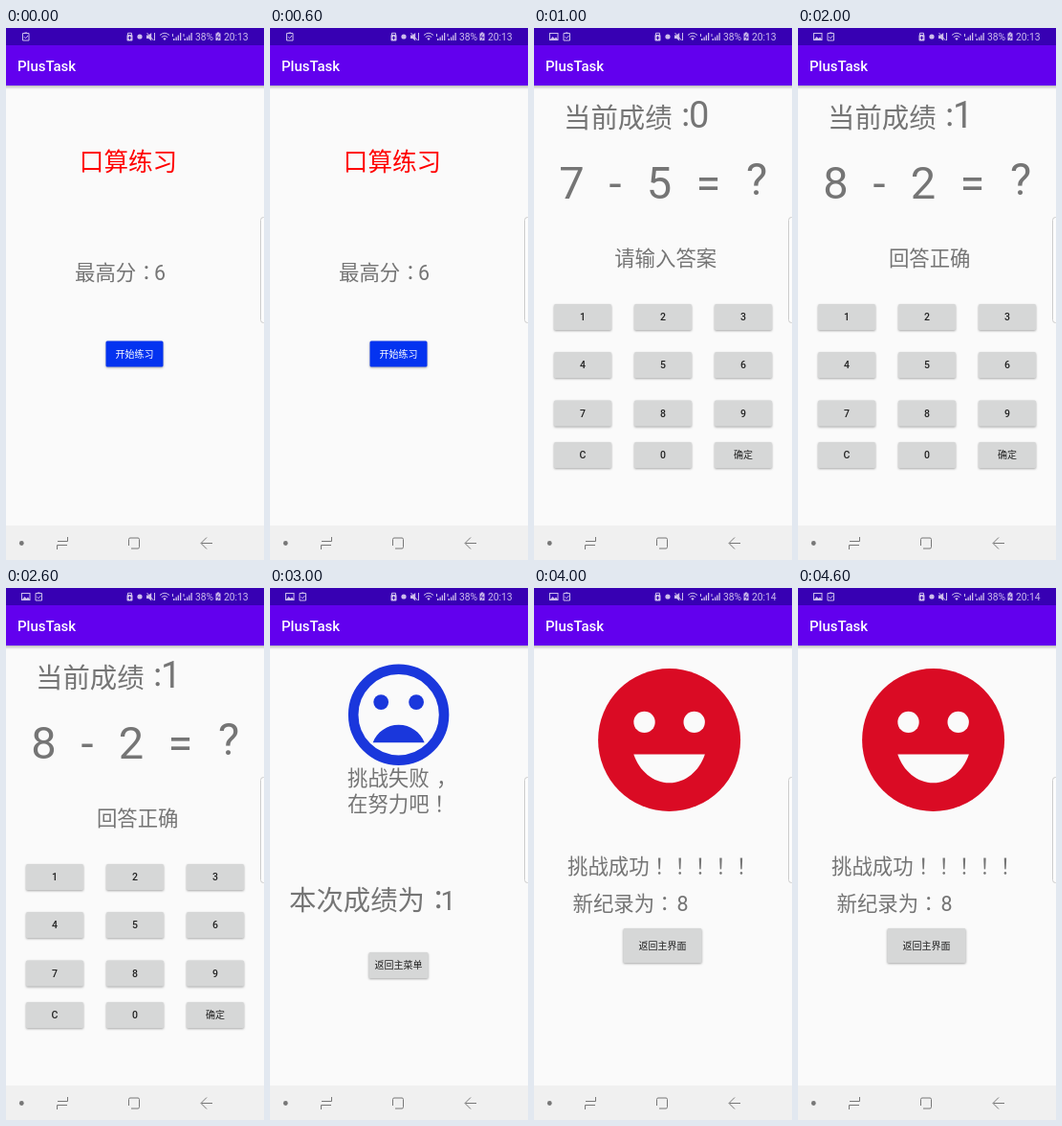
Write an HTML page that moves like this. It is 270x555 px and loops after 5 s.

```html
<!DOCTYPE html>
<html lang="zh-CN">
<head>
<meta charset="utf-8">
<title>口算练习</title>
<style>
  html, body { margin: 0; width: 100%; height: 100%; overflow: hidden; background: #fafafa; }
  svg { display: block; width: 270px; height: 555px; }
  text { font-family: Roboto, "Noto Sans CJK SC", "Noto Sans CJK", sans-serif; font-size: 21.4px; fill: #757575; white-space: pre; }
  /* Traditional forms centre the punctuation in its cell. */
  tspan[lang] { font-family: "Noto Sans CJK TC", "Noto Sans CJK", sans-serif; }
  .mid { text-anchor: middle; }
  .big { font-size: 28.4px; }
  .sum { font-size: 47px; text-anchor: middle; }
  .status text { font-size: 10.3px; fill: #cdbdec; }
  .line { fill: none; stroke: #cdbdec; }
  .button text { font-size: 10px; font-weight: 500; text-anchor: middle; }
  .button rect { filter: drop-shadow(0 1px 1px #0005); }
</style>
</head>
<body>
<svg viewBox="0 0 270 555">
  <defs>
    <linearGradient id="shade" x2="0" y2="1">
      <stop stop-color="#000" stop-opacity=".25"/>
      <stop offset="1" stop-color="#000" stop-opacity="0"/>
    </linearGradient>
  </defs>
  <rect width="270" height="555" fill="#fafafa"/>
  <rect y="60" width="270" height="4" fill="url(#shade)"/>
  <rect y="18" width="270" height="42" fill="#6200ee"/>
  <rect width="270" height="18" fill="#3700b3"/>
  <text x="12" y="45" style="font-size:15px;font-weight:500;fill:#fff">PlusTask</text>

  <g class="status" fill="#cdbdec">
    <g id="picture">
      <rect class="line" x="16.5" y="5.5" width="8.5" height="7"/>
      <path d="M17 12l2.5-3 2 2 1.5-1.5 2 2.5z"/>
    </g>
    <g id="clip" class="line">
      <path d="M17.5 5.5h6.5v7.5h-6.5zM19 9.2l1.5 1.6 2.5-2.8M19.5 5h2.5"/>
    </g>
    <rect x="126.5" y="7" width="6" height="6.5" rx="1"/>
    <path class="line" d="M127.5 7.5V5.3h4v2.2"/>
    <path d="M129.5 8.5v3.5M127.8 10.2h3.4" stroke="#3700b3"/>
    <circle cx="140" cy="9" r="2.6"/>
    <path d="M147 7.5h2.2l3-2.5v8.5l-3-2.5H147z"/>
    <path class="line" d="M147.5 5l7 8M155.5 5v8"/>
    <path class="line" d="M161 7.5q5-4.5 10 0M162.8 9.5q3.2-2.8 6.4 0"/>
    <path d="M164.3 11q1.7-1.4 3.4 0L166 13z"/>
    <g id="bars"><path d="M174 6h1v3h-1zM175 11h1.5v2H175zM177.5 9.5h1.3V13h-1.3zM179.7 7.5h1.3V13h-1.3zM182 5h1.3v8H182z"/></g>
    <use href="#bars" x="11.5"/>
    <text x="198" y="13">38%</text>
    <path d="M220.8 4.5h2.4v1h1.3V13h-5V5.5h1.3z"/>
    <path d="M222.5 6.5l-2 3h3l-2 3" fill="none" stroke="#3700b3" stroke-width=".8"/>
    <text id="clock" x="228" y="13"></text>
  </g>

  <g class="scene" data-at="0">
    <text class="mid" x="128" y="149" style="font-size:25.6px;fill:#f00">口算练习</text>
    <text x="72" y="262.5">最高分<tspan lang="zh-TW">：</tspan><tspan x="155">6</tspan></text>
    <g class="button" data-box="104.5 326.5 60 27" data-label="开始练习" data-fill="#0433f0" data-ink="#fff"></g>
  </g>

  <g class="scene" data-at="1 2">
    <text class="big" x="31" y="103.5">当前成绩<tspan lang="zh-TW">：</tspan></text>
    <text id="score" x="162" y="104" style="font-size:38px"></text>
    <text class="sum" id="left" x="39.5" y="178"></text>
    <text class="sum" x="85" y="178">-</text>
    <text class="sum" id="right" x="131" y="178"></text>
    <text class="sum" x="182.5" y="178">=</text>
    <text class="sum" x="233" y="174">?</text>
    <text class="mid" id="hint" x="137.7" y="248"></text>
    <g id="keys"></g>
  </g>

  <g class="scene" data-at="3">
    <g transform="translate(71.4 69) scale(5.27)" fill="#1a37dc">
      <circle cx="12" cy="12" r="9" fill="none" stroke="#1a37dc" stroke-width="2"/>
      <circle cx="8.5" cy="9.5" r="1.5"/>
      <circle cx="15.5" cy="9.5" r="1.5"/>
      <path d="M12 14c-2.33 0-4.32 1.45-5.12 3.5h10.24c-.8-2.05-2.79-3.5-5.12-3.5z"/>
    </g>
    <text x="81" y="206">挑战失败<tspan x="174">，</tspan></text>
    <text x="81" y="232.5">在努力吧<tspan lang="zh-TW">！</tspan></text>
    <text class="big" x="20" y="336">本次成绩为<tspan lang="zh-TW">：</tspan><tspan x="178.5">1</tspan></text>
    <g class="button" data-box="103.5 380 62 27" data-label="返回主菜单"></g>
  </g>

  <g class="scene" data-at="4">
    <g transform="translate(52.2 69.1) scale(7.45)" fill="#fafafa">
      <circle cx="12" cy="12" r="10" fill="#da0b24"/>
      <circle cx="8.5" cy="9.5" r="1.5"/>
      <circle cx="15.5" cy="9.5" r="1.5"/>
      <path d="M12 18c-2.28 0-4.22-1.66-5-4h10c-.78 2.34-2.72 4-5 4z"/>
    </g>
    <text x="35" y="298">挑战成功<tspan lang="zh-TW">！！！！！</tspan></text>
    <text x="40.5" y="337">新纪录为<tspan lang="zh-TW">：</tspan><tspan x="149.5">8</tspan></text>
    <g class="button" data-box="93.5 355 82 36" data-label="返回主界面"></g>
  </g>

  <rect x="266.5" y="197.5" width="12" height="110" rx="3" fill="#fcfcfc" stroke="#ccc"/>
  <rect y="519" width="270" height="36" fill="#f0f0f0"/>
  <circle cx="16.3" cy="537.5" r="2.4" fill="#777"/>
  <path d="M54 535.5h10.5v-4.5M64 539.5h-10.5v4.5M128.5 540v-6.5q0-1.5 1.5-1.5h8q1.5 0 1.5 1.5v8q0 1.5-1.5 1.5h-7M216 537.5h-11.5M210 531.5l-6 6 6 6" fill="none" stroke="#777"/>
</svg>
<script>
  const $ = id => document.getElementById(id);
  const scenes = [...document.querySelectorAll('.scene')];

  // Keypad: three columns, with the last row set slightly closer.
  $('keys').innerHTML = [...'123456789C0', '确定'].map((label, i) => {
    const x = 21 + i % 3 * 84, y = [288, 338, 388.5, 432][Math.floor(i / 3)];
    return `<g class="button" data-box="${x} ${y} 60 27" data-label="${label}"></g>`;
  }).join('');

  for (const button of document.querySelectorAll('.button')) {
    const { box, label, fill = '#d6d7d7', ink = '#222' } = button.dataset;
    const [x, y, w, h] = box.split(' ').map(Number);
    const size = label.length > 1 ? 'font-weight:400' : 'font-size:10.5px';
    button.innerHTML = `<rect x="${x}" y="${y}" width="${w}" height="${h}" rx="1.5" fill="${fill}"/>
      <text x="${x + w / 2}" y="${y + h / 2 + 3.8}" style="${size};fill:${ink}">${label}</text>`;
  }

  let shown = -1;

  function show(step) {
    scenes.forEach(s => s.style.display = s.dataset.at.includes(step) ? '' : 'none');
    $('picture').style.display = step ? '' : 'none';
    $('clip').setAttribute('transform', `translate(${step ? 13.5 : 0})`);
    $('clock').textContent = step === 4 ? '20:14' : '20:13';
    const solved = step === 2;
    $('score').textContent = solved ? 1 : 0;
    $('left').textContent = solved ? 8 : 7;
    $('right').textContent = solved ? 2 : 5;
    $('hint').textContent = solved ? '回答正确' : '请输入答案';
  }

  function tick() {
    const step = Math.floor(performance.now() % 5000 / 1000);
    if (step !== shown) show(shown = step);
    requestAnimationFrame(tick);
  }
  tick();
</script>
</body>
</html>
```
